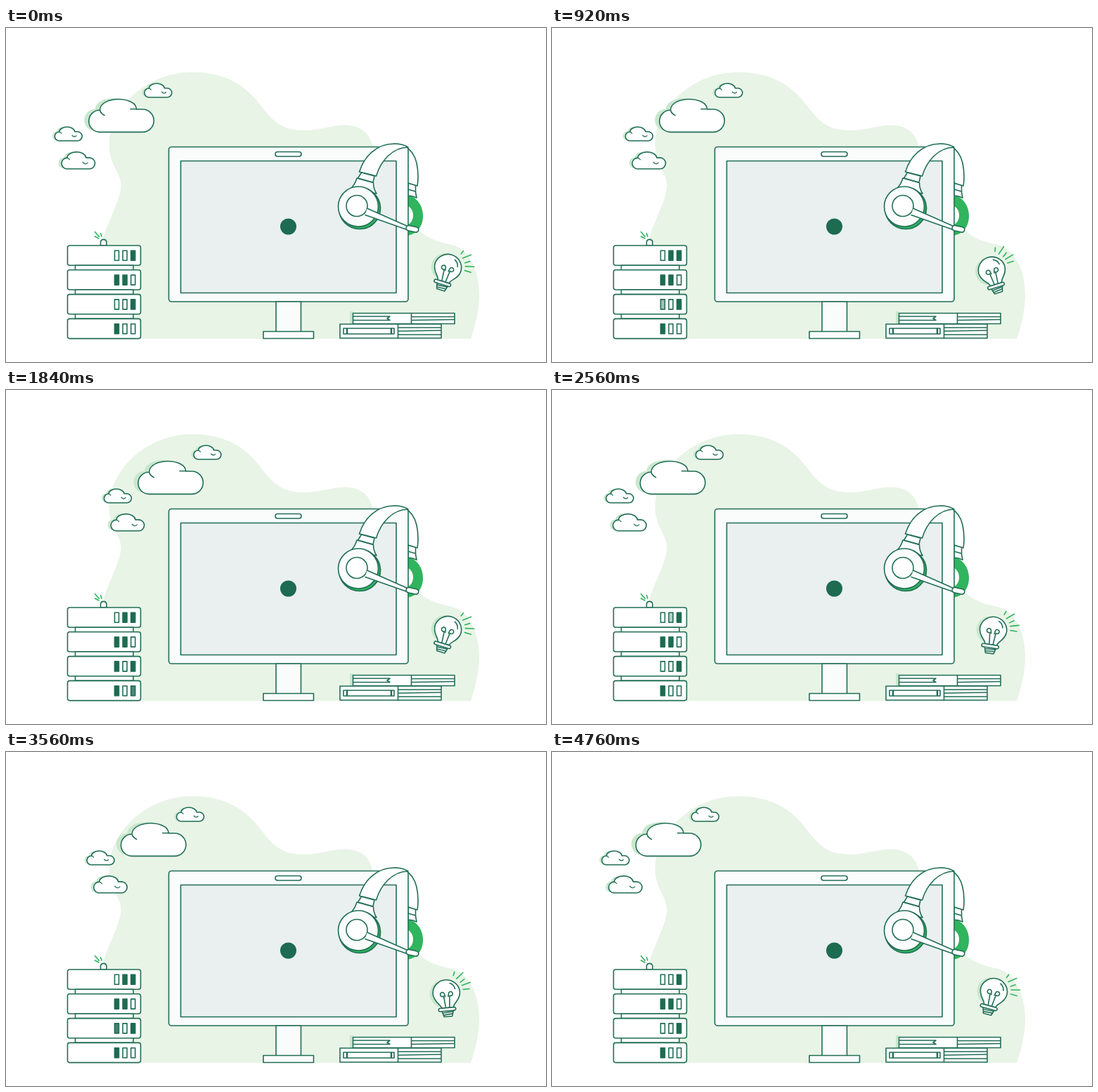
An HTML page that plays this animation: 768 px wide and 476 px high, repeating every 4.78 s.

```html
<!DOCTYPE html>
<html lang="en">
<head>
<meta charset="utf-8">
<title>Support desk</title>
<style>
  html, body { margin: 0; width: 100%; height: 100%; overflow: hidden; background: #fff; }
  svg { display: block; width: 768px; height: 476px; }
  .ink { stroke: #216e56; stroke-width: 1.6; stroke-linecap: round; stroke-linejoin: round; fill: #fff; }
  .ink * { vector-effect: non-scaling-stroke; }
  .line { fill: none; }
  .dark { fill: #1d6b50; }
  .pale { fill: #fafcfc; }
  .green { fill: #30b45d; }
  .shade { fill: #c9e7cd; stroke: none; }
  .ray { fill: none; stroke: #30b45d; stroke-width: 1.6; }
</style>
</head>
<body>
<svg viewBox="0 0 768 476" class="ink">
  <defs>
    <path id="big" d="M133.500 117C134 106 148 101.500 160 101.500S185.500 106 185.500 115.800H194A16.300 16.300 0 0 1 194 148.400H133.500A15.700 15.700 0 0 1 133.500 117Z"/>
    <path id="small" d="M7.500 7.500C7 3.500 13 .5 18.500 .5S29 3.500 29.500 7.300H33.300A6.500 6.500 0 0 1 33.300 20.300H7A6.400 6.400 0 0 1 7.500 7.500Z"/>
    <g id="puff">
      <use href="#small" class="shade" x="-3.500" y="-.5"/>
      <use href="#small"/>
      <path class="line" stroke-width="1.200" d="M7.500 7.500Q9 8 10.300 9.500M25.500 12.500Q28.500 16 31.500 13"/>
    </g>
  </defs>

  <path fill="#e8f4e6" stroke="none" d="M137 443V305C142 280 163 246 163.500 225C163.500 205 146.500 196 146.500 165C148 115 198 63 265 63C312 63 341 82 362 110C381 135 394 146 425 146C451 145 463 138 485 138.500C508 140 519 153 522 172L585 285C597 301 617 305 634 309C661 316 673 349 673 380C673 404 667 425 661 443Z"/>

  <g id="clouds">
    <use href="#puff" x="196" y="78.500"/>
    <use href="#puff" x="68.500" y="140.500"/>
    <use href="#puff" transform="translate(78 176) scale(1.220)"/>
    <use href="#big" class="shade" x="-6.500" y="-1.500"/>
    <use href="#big"/>
    <path class="line" d="M133.500 117Q134.500 121.500 140 124.500M177 115.500H186"/>
  </g>

  <g id="servers">
    <path d="M134.500 310V305A4.300 4.300 0 0 1 143 305V310Z"/>
    <path class="ray" d="M126.500 290.500L132.500 297.500M134.500 292.500L136 297M126.500 297L132 300"/>
  </g>

  <!-- rear half of the headset -->
  <path class="green" stroke="none" d="M570 238C584 240 593 253 593 268S584 294 570 296Z"/>
  <path stroke="none" d="M570 253C576 255 579 261 579 267S576 279 570 281Z"/>
  <path d="M572 221L582.500 224V234L584 242Q578 239 572 239Z"/>
  <path d="M572 230L582.500 233" class="line"/>
  <path d="M552 165C574 166 586 181 586 212Q586 219 585 225L572 221Z"/>

  <rect x="231.500" y="169.500" width="340.500" height="220.500" rx="4" class="pale"/>
  <rect x="248.500" y="189.500" width="306.500" height="188" fill="#e9f0ef"/>
  <rect x="383" y="176.500" width="37" height="6.500" rx="3.200"/>
  <rect x="384" y="390" width="35.500" height="43" class="pale"/>
  <rect x="366" y="432.500" width="71.500" height="10" class="pale"/>
  <circle cx="401.500" cy="283" r="11.500" class="dark" stroke="none"/>

  <!-- front half of the headset -->
  <path d="M502.500 205C509 184 526 165 552 165C562 165 568 167 572 170C550 170 533 189 526.500 211Z"/>
  <path d="M499 214L522.500 220.500Q522.500 229 527 236L490 229Q496 224 499 214Z"/>
  <path d="M505.500 206L524 211L522 220L500.500 214Z"/>
  <circle cx="503" cy="257" r="29.500" class="green"/>
  <circle cx="501" cy="254.500" r="28.500" class="pale"/>
  <circle cx="499" cy="253.500" r="15"/>
  <path d="M513.500 257L571 282.500L569 287L511 266.500"/>
  <rect x="569" y="282.500" width="18" height="7.500" rx="3.700" transform="rotate(12 578 286)"/>

  <path class="shade" d="M489 404H494V422H489Z"/>
  <rect x="493.500" y="406.500" width="144.500" height="15"/>
  <path class="line" d="M576.500 406.500V421.500M576.500 411.500H637M576.500 416.500L637 415.500M494 411H546L542 414L546 416.500H494"/>
  <rect x="475" y="422" width="144" height="20"/>
  <path class="line" d="M557.500 422V442M557.500 427H618M557.500 432L618 431M557.500 437H618M480 428H552V436H480Z"/>
  <path class="line" stroke-width="2.500" d="M485 429V435M548 429V435"/>

  <g id="bulb">
    <circle cx="622.500" cy="343.500" r="19.500" class="shade"/>
    <path d="M618 364C618 358 607.500 355 607.500 342A19.300 19.300 0 0 1 646 342C646 355 635 358 635 364Z"/>
    <path d="M618 368L620.500 376.500H632L634.500 368Z"/>
    <path class="line" d="M619 371L634 370M620 374L633 373"/>
    <rect x="613.500" y="364" width="24.500" height="4.500" rx="2.200"/>
    <path class="line" d="M633 329.500Q638.500 332 639.500 338"/>
    <path class="line" d="M624 363L622.500 347A3 3 0 1 1 623.500 343L624.500 348M629.500 363L631 347A3 3 0 1 0 630 343L629 348"/>
    <path class="ray" d="M639 319L641 314M643 324L653 316M648 329.500L654 325.500M650 334L662 331M651 340H660"/>
  </g>
</svg>
<script>
  const byId = id => document.getElementById(id);
  const servers = byId('servers');
  const fading = [];

  function add(tag, attrs) {
    const node = document.createElementNS('http://www.w3.org/2000/svg', tag);
    for (const key in attrs) node.setAttribute(key, attrs[key]);
    return servers.appendChild(node);
  }

  // 1 = lit, 0 = off, f = fades in
  ['0f1', '110', 'f01', '10f'].forEach((lights, row) => {
    const y = 310 + row * 34.8;
    add('rect', { x: 87.5, y, width: 104, height: 28.2, rx: 3 });
    if (row < 3) add('rect', { x: 98.5, y: y + 28.2, width: 82.5, height: 6.6 });
    [...lights].forEach((state, col) => {
      const light = add('rect', {
        x: 154.5 + col * 11.6, y: y + 7.3, width: 6, height: 14, class: 'dark',
        'fill-opacity': state === '1' ? 1 : 0
      });
      if (state === 'f') fading.push(light);
    });
  });

  const LOOP = 4780, CYCLE = 2360, STEP = 40;
  const DRIFT_END = 1880, SWING = 860, FADE_GAP = 667, FADE = 640;
  const clamp = v => Math.max(0, Math.min(1, v));

  function draw(now) {
    const t = Math.floor(now % LOOP / STEP) * STEP % CYCLE;
    byId('clouds').setAttribute('transform', `translate(${0.0381 * Math.min(t, DRIFT_END)} 0)`);
    const swing = clamp(1 - Math.abs(t - SWING) / SWING);
    byId('bulb').setAttribute('transform', `rotate(${17 - 37 * swing} 633 348)`);
    fading.forEach((light, i) =>
      light.setAttribute('fill-opacity', clamp((t - i * FADE_GAP) / FADE)));
  }

  const start = performance.now();
  function tick() {
    draw(performance.now() - start);
    requestAnimationFrame(tick);
  }
  tick();
</script>
</body>
</html>
```
